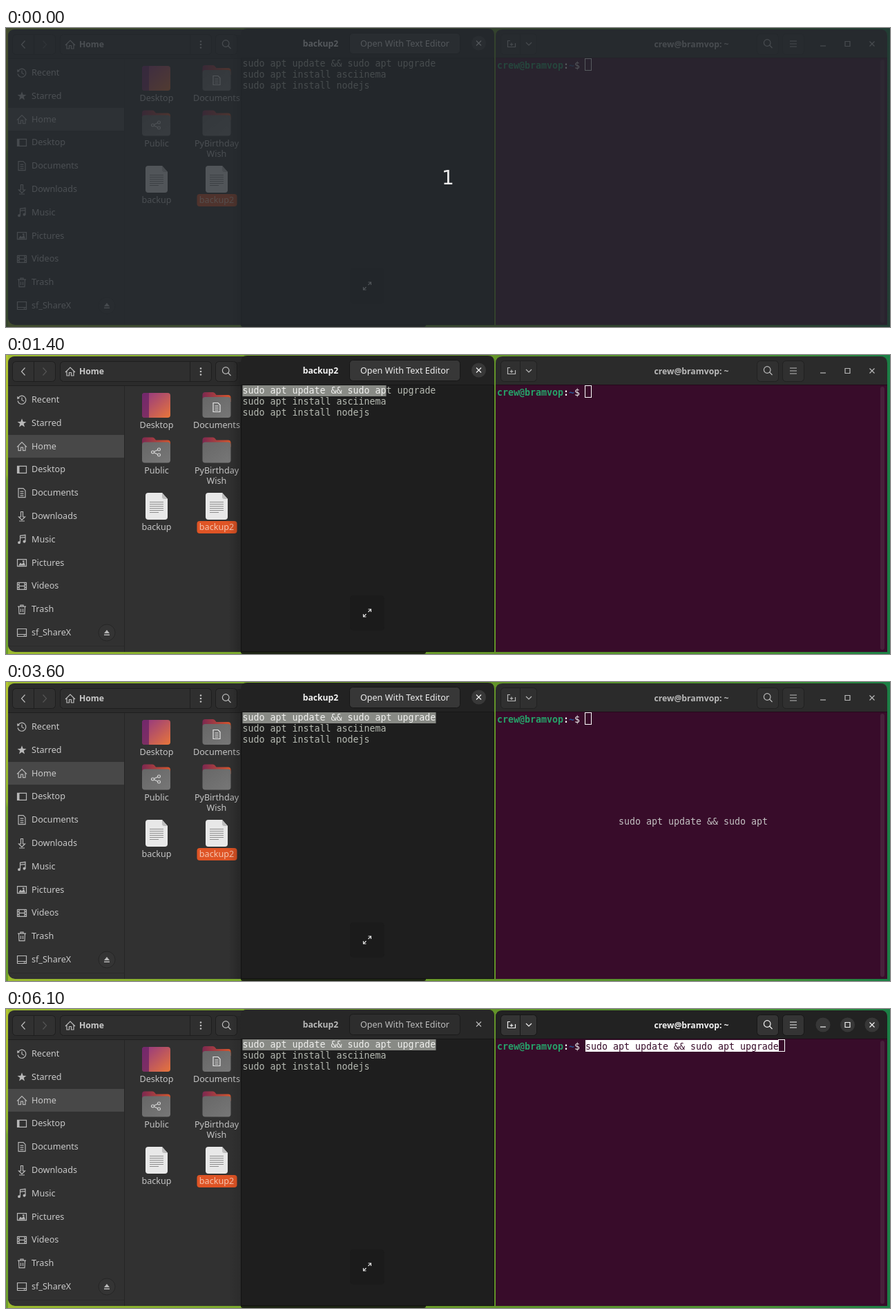
Animation of 1280x434 px, one loop 6.2 s. Source, as an HTML page:

```html
<!DOCTYPE html>
<html lang="en">
<head>
<meta charset="utf-8">
<title>Drag a command into the terminal</title>
<style>
  html, body { margin: 0; width: 100%; height: 100%; overflow: hidden; background: #24282c; }
  svg { display: block; }
  text { font: 12.6px "Noto Sans", "Open Sans", sans-serif; white-space: pre; }
  .b { font-weight: 700; font-size: 12.2px; }
  .m { font: 13.29px "DejaVu Sans Mono", monospace; }
  .mb { font-weight: 700; }
  .c { text-anchor: middle; }
  .i { fill: none; stroke: currentColor; stroke-width: 1.2; }
  .f { fill: currentColor; stroke: none; }
</style>
</head>
<body>
<svg id="stage" width="1280" height="434" viewBox="0 0 1280 434">
  <defs>
    <linearGradient id="wall">
      <stop offset="0" stop-color="#9dbb2f"/><stop offset=".27" stop-color="#79a82d"/>
      <stop offset=".55" stop-color="#639429"/><stop offset=".85" stop-color="#4a9132"/>
      <stop offset="1" stop-color="#1a7f45"/>
    </linearGradient>
    <linearGradient id="edge" x2="0" y2="1">
      <stop offset="0" stop-color="#b4c631"/><stop offset=".4" stop-color="#8fb62e"/>
      <stop offset=".42" stop-color="#77a82d"/><stop offset="1" stop-color="#6c9f2d"/>
    </linearGradient>
    <linearGradient id="sunset" y2="1">
      <stop offset="0" stop-color="#8f3585"/><stop offset="1" stop-color="#e8763a"/>
    </linearGradient>
    <linearGradient id="tab">
      <stop offset="0" stop-color="#7d2850"/><stop offset="1" stop-color="#d4562d"/>
    </linearGradient>
    <linearGradient id="front" y2="1">
      <stop offset="0" stop-color="#676767"/><stop offset="1" stop-color="#777"/>
    </linearGradient>
    <linearGradient id="shade">
      <stop offset="0" stop-opacity="0"/><stop offset="1" stop-opacity=".22"/>
    </linearGradient>
  </defs>
</svg>
<script>
const PROMPT = "crew@bramvop";
const CMD = "sudo apt update && sudo apt upgrade";
const LOOP = 6200, STEP = 100, CH = 8;
const stage = document.getElementById("stage");

const esc = s => s.replace(/&/g, "&amp;");
const text = (x, y, s, fill, cls = "") =>
  `<text x="${x}" y="${y}" fill="${fill}" class="${cls}">${esc(s)}</text>`;
const rect = (x, y, w, h, fill, r = 0, extra = "") =>
  `<rect x="${x}" y="${y}" width="${w}" height="${h}" rx="${r}" fill="${fill}" ${extra}/>`;
const icon = (x, y, d, color, extra = "") =>
  `<g transform="translate(${x} ${y})" color="${color}"><path class="i" d="${d}"/>${extra}</g>`;
const button = (x, y, w, h, fill, line) =>
  rect(x + .5, y + .5, w - 1, h - 1, fill, 5, `stroke="${line}"`);
const solid = d => `<path class="f" d="${d}"/>`;
const headPath = (x, y, w, h, r) =>
  `M${x} ${y + h}V${y + r}q0 ${-r} ${r} ${-r}h${w - 2 * r}q${r} 0 ${r} ${r}v${h - r}z`;

// Icons are drawn around their own centre.
const HOUSE = "M-7 1L0-6 7 1M-5-1V6H-1.5V1.500H1.500V6H5V-1";
const PAGE = "M-5-6.500H2L5-3.500V6.500H-5zM-2.500-2H2.500M-2.500 1H2.500M-2.500 4H2.500";
const LENS = "M4-1.500A4.800 4.800 0 1 1-5.600-1.500A4.800 4.800 0 1 1 4-1.500M2.700 2L6.500 6";
const CROSS = "M-3.500-3.500L3.500 3.500M3.500-3.500L-3.500 3.500";
const STAR = "M0-6.500L1.700-2 6.500-1.900 2.700 1 4 5.700 0 3-4 5.700-2.700 1-6.500-1.900-1.700-2z";

const places = [
  ["Recent", "M-5.500-2.500A6 6 0 1 1-6 1.500M0-3.500V.5L3 2", solid("M-7-5L-6.500-.5-3-2.500z")],
  ["Starred", "", solid(STAR)],
  ["Home", HOUSE],
  ["Desktop", "M-6.500-5H6.500V5H-6.500z", solid("M-6.500-5H-3.500V5H-6.500z")],
  ["Documents", PAGE],
  ["Downloads", "M-1.500-6.500H1.500V1H4.500L0 5.500-4.500 1H-1.500zM-4 7H4"],
  ["Music", "M-2.500 4V-5.500L5-6.500V3M-2.500-2.500L5-3.500",
    solid("M-6 4.500a2 2 0 1 1 4 0a2 2 0 1 1-4 0M1.500 3a2 2 0 1 1 4 0a2 2 0 1 1-4 0")],
  ["Pictures", "M-6.500-5H6.500V5H-6.500z", solid("M-5 4L-2 0 0 2 3-1 5 4zM1-3h2.500v2H1z")],
  ["Videos", "M-6.500-5.500V5.500M6.500-5.500V5.500M-4-5V5M4-5V5M-6.500-5H6.500M-6.500 5H6.500M-4 0H4M-6.500-2H-4M-6.500 2H-4M4-2H6.500M4 2H6.500"],
  ["Trash", "M-6-4H6M-4.500-4L-4 6.500H4L4.500-4M-2-4V-6H2V-4M-1.500-1V4M1.500-1V4"],
  ["sf_ShareX", "M-6.500-5.500H6.500V5.500H-6.500zM-6.500 2.500H6.500M2.500 4H5"]
];

function folder(x, y, emblem) {
  return `<path d="M${x} ${y + 10}V${y + 4}q0-4 4-4h11q2 0 3 1.500l2 2.500h17q4 0 4 4v6z" fill="url(#tab)"/>`
    + rect(x, y + 7, 41, 30, "url(#front)", 4) + (emblem || "");
}

function doc(x, y) {
  let s = `<path d="M${x + 4} ${y}h20l8 9v26q0 4-4 4h-24q-4 0-4-4v-31q0-4 4-4z" fill="#e8e8e8"/>`
    + `<path d="M${x + 24} ${y}v6q0 3 3 3h5z" fill="#bdbdbd"/>`;
  for (let i = 0; i < 6; i++) s += rect(x + 6, y + 13 + i * 3, i == 5 ? 13 : 20, 1, "#8c8c8c");
  return s;
}

function filesWindow() {
  const ink = "#bdbdbd", line = "#1e1e1e";
  let s = rect(340, 428, 268, 6, "#1d2414", 3)
    + rect(3, 2, 605, 429, "#313131", 10)
    + `<path d="${headPath(3, 2, 605, 42, 10)}" fill="#2b2b2b"/>`
    + rect(3, 44, 605, 1, "#1f1f1f")
    + button(9, 9, 63, 30, "#313131", line) + rect(40, 10, 1, 28, line)
    + icon(25, 24, "M2.500-5.500L-2.500 0 2.500 5.500", ink) + icon(56, 24, "M-2.500-5.500L2.500 0-2.500 5.500", "#555")
    + button(78, 9, 220, 30, "#2f2f2f", line) + rect(266, 10, 1, 28, line)
    + icon(93, 24, HOUSE, ink) + text(106, 28, "Home", "#c8c8c8", "b")
    + [19.500, 24, 28.500].map(y => `<circle cx="282" cy="${y}" r="1.300" fill="${ink}"/>`).join("")
    + button(303, 9, 32, 30, "#313131", line) + icon(319, 24, LENS, ink)
    + rect(3, 116, 168, 33, "#484848") + rect(171, 45, 1, 386, "#252525")
    + rect(3, 422, 168, 1, "#2a2a2a");
  places.forEach(([name, d, extra], i) => {
    const y = 65 + i * 33.800;
    s += icon(23, y, d, "#b8b8b8", extra) + text(37, Math.round(y + 4), name, "#c9c9c9");
  });
  s += `<circle cx="146" cy="403" r="12" fill="#343434" stroke="#262626"/>`
    + icon(146, 403, "", "#b8b8b8", solid("M0-4L4 1H-4zM-4 2.500H4V4H-4z"));

  s += rect(197, 55, 41, 36, "url(#sunset)", 4)
    + `<path d="M207 55h-6q-4 0-4 4v28q0 4 4 4h6z" fill="#6b2466" opacity=".8"/>`
    + folder(284.500, 54, icon(305, 76, PAGE, "#e4e4e4"))
    + folder(197, 119.500, icon(217, 141, "M-4 0L4-4M-4 0L4 4", "#d5d5d5",
      `<g class="i"><circle cx="-4.500" r="2" fill="#707070"/><circle cx="4.500" cy="-4" r="2" fill="#707070"/><circle cx="4.500" cy="4" r="2" fill="#707070"/></g>`))
    + folder(284.500, 119.500) + doc(202, 200) + doc(289, 200)
    + rect(276.500, 241, 58, 18, "#df5425", 4);
  [[218, 106, "Desktop"], [305, 106, "Documents"], [218, 172, "Public"], [305, 172, "PyBirthday"],
   [305, 187, "Wish"], [218, 254, "backup"]].forEach(([x, y, n]) => s += text(x, y, n, "#c4c4c4", "c"));
  return s + text(305, 254, "backup2", "#f5c3ae", "c");
}

function previewHead(on) {
  const ink = on ? "#f4f4f4" : "#b9b9b9";
  return `<path d="${headPath(340, 1, 367, 42, 9)}" fill="${on ? "#222" : "#272727"}"/>`
    + text(455.500, 26.500, "backup2", ink, "b c")
    + button(497, 7, 161, 31, on ? "#373737" : "#2d2d2d", on ? "#171717" : "#1b1b1b")
    + text(577.500, 26.500, "Open With Text Editor", on ? "#ededed" : "#bcbcbc", "c")
    + (on ? `<circle cx="684.500" cy="22" r="10.500" fill="#383838"/>` : "")
    + icon(684.500, 22, CROSS, ink);
}

function previewWindow() {
  return rect(322, 10, 18, 421, "url(#shade)", 0, `id="glow"`)
    + rect(340, 20, 367, 411, "#121212") + rect(341, 43, 365, 387, "#1e1e1e")
    + previewHead(true) + `<g id="previewOff">${previewHead(false)}</g>`
    + rect(340, 43, 367, 1, "#161616")
    + rect(342.500, 44, 0, 16, "#888a85", 0, `id="sel1"`) + rect(342.500, 60, 0, 16, "#888a85", 0, `id="sel2"`)
    + ["line1", "line2"].map((id, i) =>
      `<text id="${id}" class="m" x="342.500" y="${56 + i * 16}"><tspan fill="#f0f0ee"></tspan><tspan fill="#b6bab2"></tspan></text>`).join("")
    + text(342.500, 88, "sudo apt install nodejs", "#b6bab2", "m")
    + rect(498, 349, 50, 51, "#1b1b1b", 5)
    + icon(523, 374.500, "M1.500-1.500L5-5M1.500-5.500H5.500V-1.500M-1.500 1.500L-5 5M-1.500 5.500H-5.500V1.500", "#e0e0e0");
}

function termHead(on) {
  const ink = on ? "#f2f2f2" : "#b9b9b9";
  const fill = on ? "#343434" : "#303030", line = on ? "#171717" : "#212121";
  const ctl = (x, d) => (on ? `<circle cx="${x}" cy="23" r="10.500" fill="#373737"/>` : "") + icon(x, 23, d, ink);
  return `<path d="${headPath(709, 2, 567, 41, 10)}" fill="${on ? "#222" : "#2b2b2b"}"/>`
    + button(716, 8, 53, 31, fill, line) + rect(744, 9, 1, 29, line)
    + icon(732, 23, "M-2-4.500H-5.500V4.500H5.500V-1M0-1.500V3M-2.300.8H2.300", ink)
    + icon(757, 23, "M-4-2L0 2 4-2", ink)
    + text(992.500, 27.500, PROMPT + ": ~", ink, "b c")
    + button(1087, 8, 32, 31, fill, line) + icon(1103, 23, LENS, ink)
    + button(1124, 8, 32, 31, fill, line) + icon(1140, 23, "M-5-4H5M-5 0H5M-5 4H5", ink)
    + ctl(1183, "M-4 3H4") + ctl(1218.500, "M-3.500-3.500H3.500V3.500H-3.500z") + ctl(1254, CROSS);
}

function termWindow() {
  return rect(709, 43, 567, 388, "#380c2a")
    + termHead(false) + `<g id="termOn">${termHead(true)}</g>`
    + rect(709, 43, 567, 1, "#25081c") + rect(1266, 46, 6, 382, "#48213b", 3)
    + text(711, 58.500, PROMPT, "#26a269", "m mb") + text(807, 58.500, ":", "#f0f0f0", "m mb")
    + text(815, 58.500, "~", "#2a5795", "m mb") + text(823, 58.500, "$", "#f0f0f0", "m")
    + `<g id="paste">${rect(839, 45, 35 * CH, 17, "#fff")}${text(839, 58.500, CMD, "#380c2a", "m")}</g>`
    + rect(838.500, 44.500, 9, 17, "none", 0, `id="hollow" stroke="#fff"`)
    + rect(1119, 45, 8, 16, "#fff", 0, `id="block"`);
}

stage.insertAdjacentHTML("beforeend",
  rect(0, 0, 1280, 434, "url(#wall)") + rect(0, 0, 3, 434, "url(#edge)")
  + filesWindow() + previewWindow() + termWindow()
  + text(0, 0, CMD.slice(0, 27), "#c3c1c2", "m").replace("<text", `<text id="drag"`)
  + `<g id="count">${rect(0, 0, 1280, 434, "#252a2f", 0, `opacity=".77"`)}
     <text x="640" y="227" fill="#ececec" class="c" style="font:28px 'DejaVu Sans',sans-serif">1</text></g>`);

const el = id => document.getElementById(id);
const show = (id, on) => el(id).style.display = on ? "" : "none";
const at = (table, t) => table.reduce((v, row) => t >= row[0] ? row : v, null);

// time, selected characters in line 1, selected characters in line 2
const picks = [[0, 0, 0], [900, 2, 0], [1000, 6, 0], [1100, 11, 0], [1200, 35, 16], [1300, 21, 0],
  [1400, 26, 0], [1500, 28, 0], [1600, 30, 0], [1700, 32, 0], [1800, 35, 0]];
// time, x, baseline of the carried text
const path = [[3200, 346, 64], [3300, 412, 112], [3400, 565, 184], [3500, 752, 219], [3600, 887, 207],
  [3700, 885, 163], [3800, 875, 128], [3900, 871, 120], [4000, 870, 115]];

function mark(id, s, n) {
  const [a, b] = el(id).children;
  a.textContent = s.slice(0, n);
  b.textContent = s.slice(n);
}

function draw(t) {
  show("count", t < 100);

  const [, n, m] = at(picks, t);
  mark("line1", CMD, n);
  mark("line2", "sudo apt install asciinema", m);
  el("sel1").setAttribute("width", m ? 360.500 : n * CH);
  el("sel2").setAttribute("width", m * CH);

  const p = at(path, t);
  show("drag", p && t < 4200);
  if (p) {
    el("drag").setAttribute("x", p[1]);
    el("drag").setAttribute("y", p[2]);
  }

  const pasted = t >= 4300;
  const focus = Math.min(1, Math.max(0, (t - 4700) / 500));
  show("paste", pasted);
  el("hollow").setAttribute("x", pasted ? 1118.500 : 838.500);
  show("hollow", t < 4800 || t >= 6100);
  show("block", t >= 4800 && t < 5400 || t >= 5900 && t < 6100);
  el("termOn").setAttribute("opacity", focus);
  el("previewOff").setAttribute("opacity", focus);
  el("glow").setAttribute("opacity", 1 - focus / 2);
}

let last = -1;
function tick() {
  const t = Math.floor(performance.now() % LOOP / STEP) * STEP;
  if (t !== last) draw(last = t);
  requestAnimationFrame(tick);
}
tick();
</script>
</body>
</html>
```
